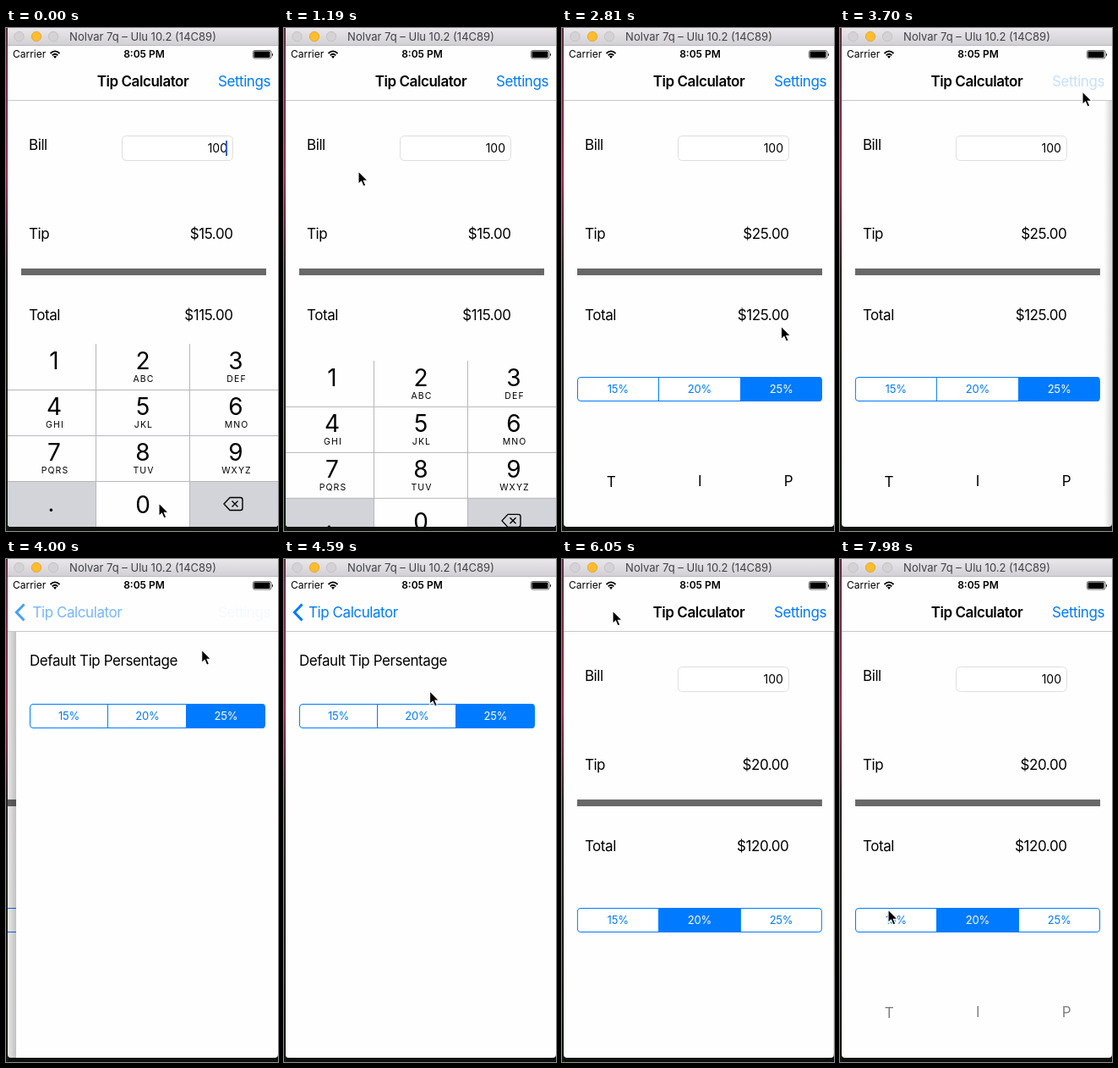
An HTML page that plays this animation: 322 px wide and 594 px high, repeating every 8000 ms.

```html
<!DOCTYPE html>
<html lang="en">
<head>
<meta charset="utf-8">
<title>Tip Calculator</title>
<style>
  html, body { margin: 0; width: 100%; height: 100%; overflow: hidden; background: #0d100c; }
  svg { display: block; width: 100%; height: 100%; font-family: Inter, sans-serif; }
  text { white-space: pre; }
  .body { font-size: 17px; letter-spacing: -.43px; }
  .bold { font-weight: 600; }
  .blue { fill: #007aff; }
  .mid { text-anchor: middle; }
  .end { text-anchor: end; }
</style>
</head>
<body>
<svg id="stage" viewBox="0 0 322 594"></svg>
<script>
const LOOP = 8000, STEP = 147.5;
const BLUE = '#007aff';
const PUSH = 3.6999, POP = 5.5; // seconds
const stage = document.getElementById('stage');
const $ = id => document.getElementById(id);

const label = (x, y, str, cls = '', attrs = '') =>
  `<text x="${x}" y="${y}" class="${cls}" ${attrs}>${str}</text>`;
const box = (x, y, w, h, fill, attrs = '') =>
  `<rect x="${x}" y="${y}" width="${w}" height="${h}" fill="${fill}" ${attrs}/>`;

function segments(id, x, y, w) {
  const part = w / 3, h = 28;
  const edge = i => Math.ceil(x + i * part) - .5;
  let cells = '', lines = '', names = '';
  ['15%', '20%', '25%'].forEach((name, i) => {
    cells += box(edge(i), y, edge(i + 1) - edge(i), h + 1, '#fff', `id="${id}Cell${i}"`);
    if (i) lines += `M${edge(i)} ${y}v${h}`;
    names += label(x + (i + .5) * part, y + 19, name, 'mid', `id="${id}Name${i}" font-size="13" letter-spacing="-.2"`);
  });
  return `<clipPath id="${id}Clip"><rect x="${x}" y="${y}" width="${w}" height="${h + 1}" rx="4"/></clipPath>
    <g clip-path="url(#${id}Clip)">${cells}</g>
    <path d="${lines}" stroke="${BLUE}"/>
    ${box(x + .5, y + .5, w - 1, h, 'none', `rx="3.5" stroke="${BLUE}"`)}${names}`;
}

function keypad() {
  const letters = ['', 'ABC', 'DEF', 'GHI', 'JKL', 'MNO', 'PQRS', 'TUV', 'WXYZ'];
  const cols = [57, 162, 272];
  let keys = letters.map((s, i) => {
    const x = cols[i % 3], y = 403 + Math.floor(i / 3) * 54;
    return label(x, y, i + 1, 'mid', 'font-size="28"') +
      label(x + 1, y + 15, s, 'mid', 'font-size="10.5" letter-spacing="1.1"');
  }).join('');
  keys += label(162, 573, 0, 'mid', 'font-size="28"') + label(53.5, 571, '.', 'mid', 'font-size="27"');
  return box(2, 373, 320, 216, '#fefefe') +
    box(2, 535, 105, 54, '#d2d4d9') + box(217, 535, 105, 54, '#d2d4d9') +
    '<path d="M106.5 373V589M217.5 373V589M2 427.5H322M2 481.5H322M2 535.5H322" stroke="#b6b7bb"/>' + keys +
    `<path d="M265 554.5H277.5Q280 554.5 280 557V567Q280 569.5 277.5 569.5H265L258 562Z
      M267.5 558.5l7 7M274.5 558.5l-7 7" fill="none" stroke="#000" stroke-width="1.4" stroke-linejoin="round"/>`;
}

const page = box(2, 86, 320, 503, '#fefefe');

const mainView = `<g id="main">${page}
  ${label(27, 144, 'Bill', 'body')}
  ${box(137.5, 127.5, 131, 29, '#fff', 'rx="5" stroke="#dedede"')}
  ${label(262, 147, '100', 'end', 'font-size="14"')}
  ${box(260, 133, 2, 18, '#3a5fe0', 'id="caret"')}
  ${label(27, 249, 'Tip', 'body')}${label(268.5, 249, '', 'body end', 'id="tip"')}
  ${box(18, 284, 290, 8, '#686868')}
  ${label(27, 345, 'Total', 'body')}${label(268.5, 345, '', 'body end', 'id="total"')}
  ${segments('rate', 18, 412, 290)}
  <g id="letters">${label(58, 542, 'T', 'body mid')}${label(163, 541, 'I', 'body mid')}${label(268, 541, 'P', 'body mid')}</g>
  <g id="pad">${keypad()}</g>
  </g>`;

const settingsView = `<g id="settings">
  ${box(-7, 86, 9, 503, 'url(#shade)')}${page}
  ${label(18, 126, 'Default Tip Persentage', 'body')}
  ${segments('preset', 18, 171, 279)}
  </g>`;

const statusBar = label(8, 35, 'Carrier', '', 'font-size="12"') +
  label(163.5, 35, '8:05 PM', 'mid bold', 'font-size="12"') +
  `<g fill="none" stroke="#000" stroke-width="1.8">
    <path d="M52.5 30Q58 24.7 63.5 30M54.7 32.3Q58 29.2 61.3 32.3"/></g>
  <path d="M56 33.6Q58 32 60 33.6L58 36Z"/>
  ${box(292.5, 26.5, 21.5, 9.5, 'none', 'rx="2" stroke="#000" stroke-width=".6"')}
  ${box(293.5, 27.5, 19, 7.5, '#000', 'rx="1"')}
  <path d="M315 29.5q2 1.8 0 4z"/>`;

const lights = [15.5, 36, 56].map((x, i) =>
  `<circle cx="${x}" cy="10" r="5.7" fill="${i === 1 ? '#ffbd2e' : '#d4d2d5'}" stroke="${i === 1 ? '#e0a32a' : '#bfbdc0'}" stroke-width=".8"/>`).join('');

stage.innerHTML = `<defs>
  <linearGradient id="bar" x2="0" y2="1"><stop stop-color="#e9e7ea"/><stop offset="1" stop-color="#d1cfd4"/></linearGradient>
  <linearGradient id="shade"><stop stop-opacity="0"/><stop offset="1" stop-opacity=".16"/></linearGradient>
  <linearGradient id="desk" x2="0" y2="1">
    <stop stop-color="#5a3040"/><stop offset=".3" stop-color="#95304a"/>
    <stop offset=".48" stop-color="#2a2420"/><stop offset="1" stop-color="#101a0c"/></linearGradient>
  <clipPath id="window"><path d="M2 0H322V585q0 4-4 4H6q-4 0-4-4Z"/></clipPath>
  </defs>
  ${box(0, 0, 322, 594, '#0d100c')}${box(0, 0, 3, 594, 'url(#desk)')}
  <g clip-path="url(#window)">
    ${mainView}
    ${box(2, 86, 320, 503, '#000', 'id="dim"')}
    ${settingsView}
    ${box(2, 21, 320, 65, '#fefefe')}
    <path d="M2 85.5H322" stroke="#c8c8c8"/>
    ${statusBar}
    ${label(162, 69, 'Tip Calculator', 'body bold mid', 'id="title"')}
    ${label(313, 69, 'Settings', 'body end blue', 'id="open"')}
    <path id="chevron" d="M21.5 53.5L12.3 63L21.5 72.5" fill="none" stroke="${BLUE}" stroke-width="3"/>
    ${label(29, 69, 'Tip Calculator', 'body blue', 'id="back"')}
    ${box(2, 0, 320, 21, 'url(#bar)')}
    <path d="M2 20.5H322" stroke="#b9b7bb"/>
    ${lights}
    ${label(162, 15, 'Nolvar 7q – Ulu 10.2 (14C89)', 'mid', 'font-size="13" fill="#414043"')}
  </g>
  <path id="pointer" d="M0 -1V14.5L3.5 11.2L6 17L8.8 15.8L6.3 10.2H11Z" stroke="#fff" stroke-width="1.1"/>`;

// Pointer trips: departure, arrival (seconds) and destination.
const trips = [
  { from: 0, to: .6, x: 46, y: 103 },
  { from: .6, to: .74, x: 88, y: 170 },
  { from: 1.2, to: 1.63, x: 158, y: 428 },
  { from: 1.92, to: 2.37, x: 252, y: 428 },
  { from: 2.5, to: 3.55, x: 287, y: 76 },
  { from: 3.7, to: 4.29, x: 177, y: 140 },
  { from: 4.44, to: 4.8, x: 165, y: 186 },
  { from: 4.95, to: 5.4, x: 60, y: 62 },
  { from: 6.5, to: 6.95, x: 57, y: 444 },
  { from: 7.1, to: 7.6, x: 57, y: 415 }
];

const ramp = (s, from, to) => Math.min(1, Math.max(0, (s - from) / (to - from)));
const ease = (s, from, to) => {
  const t = ramp(s, from, to);
  return t * t * (3 - 2 * t);
};
const decay = t => Math.exp(-11.7 * Math.max(0, t));

function pointerAt(s) {
  let x = 181, y = 562;
  for (const trip of trips) {
    const t = ease(s, trip.from, trip.to);
    x += (trip.x - x) * t;
    y += (trip.y - y) * t;
  }
  return [x, y];
}

const shift = (id, x, y = 0) => $(id).setAttribute('transform', `translate(${x} ${y})`);
const fade = (id, value) => $(id).setAttribute('opacity', value);

function choose(id, chosen) {
  for (let i = 0; i < 3; i++) {
    $(id + 'Cell' + i).setAttribute('fill', i === chosen ? BLUE : '#fff');
    $(id + 'Name' + i).setAttribute('fill', i === chosen ? '#fff' : BLUE);
  }
}

function draw(ms) {
  // The screen refreshes in coarse steps.
  const s = Math.floor(ms / STEP) * .148;
  const popped = s >= POP;
  const slide = popped ? decay(s - POP) : 1 - decay(s - PUSH);
  const nav = popped ? 1 - ramp(s, POP, POP + .45) : ramp(s, PUSH, PUSH + .35);
  const chosen = s < 1.9 ? 0 : s < 2.5 ? 1 : s < 4.88 ? 2 : 1;
  const tip = 15 + chosen * 5;

  $('tip').textContent = `$${tip}.00`;
  $('total').textContent = `$${100 + tip}.00`;
  choose('rate', chosen);
  choose('preset', chosen);

  shift('main', -96 * slide);
  shift('settings', 320 * (1 - slide));
  fade('settings', s >= PUSH && slide > .002 || (s >= PUSH && !popped) ? 1 : 0);
  fade('dim', .1 * slide);
  shift('pad', 0, 217 * ease(s, 1.1, 1.55));
  fade('caret', 1 - ramp(s, .3, .6));
  fade('letters', popped ? ease(s, 7, 9) : 1);

  const openPressed = s >= PUSH && !popped;
  const backAlpha = nav ** 4 * (s >= 5.4 ? .18 : 1);
  shift('title', -80 * slide);
  fade('title', (1 - nav) ** 2);
  fade('open', (1 - nav) * (openPressed ? .22 : 1));
  shift('back', 78 * (1 - slide));
  fade('back', backAlpha);
  fade('chevron', Math.min(1, backAlpha * 1.4));

  shift('pointer', ...pointerAt(s));
}

const start = performance.now();
function tick() {
  draw((performance.now() - start) % LOOP);
  requestAnimationFrame(tick);
}
tick();
</script>
</body>
</html>
```
